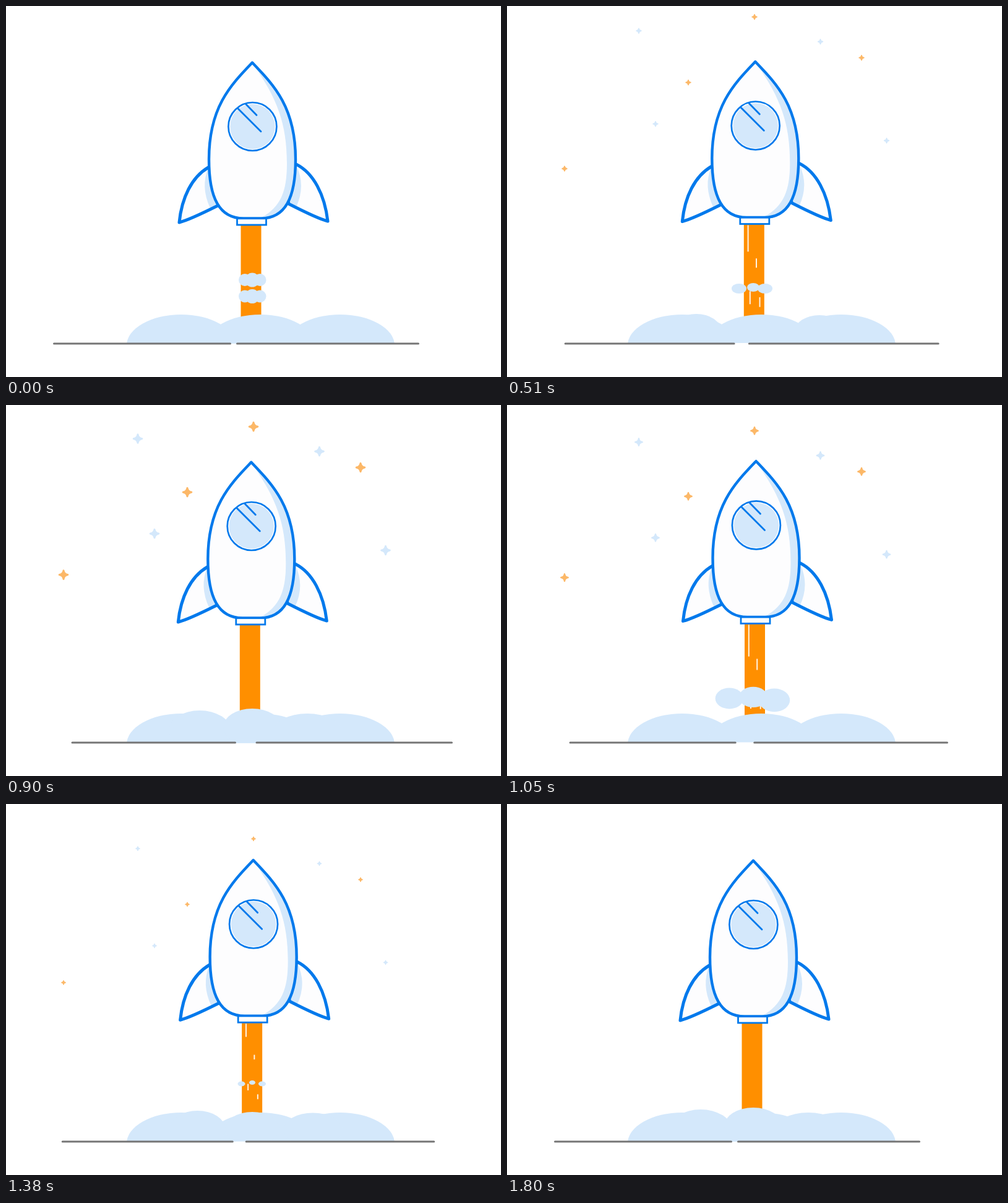
An HTML page with a canvas that plays this animation: 800 by 600 pixels, repeating every 1.83 s.

```html
<!DOCTYPE html>
<html lang="en">
<head>
<meta charset="utf-8">
<title>Rocket launch</title>
<style>
html, body { margin: 0; width: 100%; height: 100%; overflow: hidden; background: #fff; }
canvas { display: block; width: 800px; height: 600px; }
</style>
</head>
<body>
<canvas id="stage" width="800" height="600"></canvas>
<script>
const ctx = document.getElementById('stage').getContext('2d');
const LOOP = 1830, STEP = 30, BEAT = 450, HALF = 900;
const BLUE = '#0079ec', PALE = '#d4e8fb', ORANGE = '#ff8f00', AMBER = '#fcb868';

// Piecewise linear mix of rows [time, ...values].
function mix(rows, t) {
  let i = 1;
  while (i < rows.length - 1 && rows[i][0] < t) i++;
  const a = rows[i - 1], b = rows[i];
  const k = Math.min(1, Math.max(0, (t - a[0]) / (b[0] - a[0])));
  return a.slice(1).map((v, n) => v + (b[n + 1] - v) * k);
}

const SHAKE = [[0, 0, 0], [60, 3.3, -1.5], [210, 5.3, 0], [300, -2.5, -4.2], [450, 0, 0]];
const SPARK = [[0, 0], [60, 0.75], [210, 1], [300, 0.22], [340, 0]];

// Age, centre x, centre y, radius x, radius y.
const PUFFS = [
  [[0, 386, 448, 0, 0], [60, 375, 457, 12, 8], [210, 349, 486, 30, 23],
   [300, 327, 505, 42, 32], [450, 313, 526, 50, 32], [510, 306, 525, 40, 27], [570, 300, 540, 20, 15]],
  [[0, 398, 446, 0, 0], [60, 398, 455, 10, 7], [210, 398, 484, 32, 23],
   [300, 397, 502, 48, 32], [450, 398, 521, 47, 30], [510, 398, 530, 40, 25], [570, 398, 545, 20, 15]],
  [[0, 411, 448, 0, 0], [60, 417, 457, 12, 8], [210, 442, 491, 34, 26],
   [300, 452, 510, 44, 32], [450, 487, 528, 55, 29], [510, 505, 526, 40, 26], [570, 515, 540, 20, 15]]
];

// x, start y, drift over the half loop, colour.
const STARS = [
  [400, -5, 40, AMBER], [293, 101, 40, AMBER], [573, 61, 40, AMBER], [93, 248, 26.6, AMBER],
  [506.5, 35, 40, PALE], [213, 21.5, 33, PALE], [240, 168, 40, PALE], [613.5, 195, 40, PALE]
];

// x, top, top shift, length.
const DASHES = [[6.8, 356, 0, 57], [20.2, 403, 9, 20], [10, 444, 25, 28], [25.7, 468, 6, 21]];

const body = new Path2D('M398 91.5C432 127 468 163 468 248C468 311 451 343.5 412 343.5H384' +
  'C345 343.5 328 311 328 248C328 163 364 127 398 91.5Z');
const shade = new Path2D('M402 98C438 150 454 190 454 255C454 300 444 325 413 342L475 345V90Z');
const finL = new Path2D('M327 261C300 277 284 310 280 350Q296 346 342 323L350 290Z');
const finR = new Path2D('M469 256C497 270 515 305 520 348Q504 344 457 320L450 290Z');
const finShadeL = new Path2D('M327 262Q314 292 330 327L350 320V262Z');
const finShadeR = new Path2D('M469 258Q485 290 469 325L450 320V258Z');

function line(x1, y1, x2, y2, color, width, cap = 'round') {
  ctx.beginPath();
  ctx.moveTo(x1, y1);
  ctx.lineTo(x2, y2);
  ctx.strokeStyle = color;
  ctx.lineWidth = width;
  ctx.lineCap = cap;
  ctx.stroke();
}

function oval(x, y, rx, ry, color = PALE) {
  ctx.beginPath();
  ctx.ellipse(x, y, Math.max(0, rx), Math.max(0, ry), 0, 0, Math.PI * 2);
  ctx.fillStyle = color;
  ctx.fill();
}

function shape(path, shadow, width) {
  ctx.fillStyle = '#fdfdfe';
  ctx.fill(path);
  ctx.save();
  ctx.clip(path);
  ctx.fillStyle = PALE;
  ctx.fill(shadow);
  ctx.restore();
  ctx.strokeStyle = BLUE;
  ctx.lineWidth = width;
  ctx.lineJoin = 'round';
  ctx.stroke(path);
}

function star(x, y, r, color) {
  if (r <= 0) return;
  const tip = r * 0.82, dent = r * 0.16;
  ctx.beginPath();
  ctx.moveTo(x + tip, y);
  for (let i = 1; i <= 4; i++) {
    const a = i * Math.PI / 2, m = a - Math.PI / 4;
    ctx.quadraticCurveTo(x + dent * Math.cos(m), y + dent * Math.sin(m),
      x + tip * Math.cos(a), y + tip * Math.sin(a));
  }
  ctx.closePath();
  ctx.fillStyle = ctx.strokeStyle = color;
  ctx.lineWidth = r * 0.36;
  ctx.lineJoin = 'round';
  ctx.fill();
  ctx.stroke();
}

function flame(t) {
  ctx.fillStyle = ORANGE;
  ctx.fillRect(379.5, 350, 33, 170);
  const [k] = mix(SPARK, t % BEAT);
  if (k <= 0) return;
  DASHES.forEach(([x, top, shift, len], i) => {
    if (i === 0 && t > HALF && k < 0.3) return;
    const y = top + shift * k;
    line(379.5 + x, y, 379.5 + x, y + len * k, 'rgba(255,255,255,.9)', 2, 'butt');
  });
}

function rocket() {
  shape(finL, finShadeL, 5);
  shape(finR, finShadeR, 5);
  shape(body, shade, 4.4);
  ctx.fillStyle = '#fff';
  ctx.fillRect(373.5, 343.7, 47, 10.3);
  ctx.lineJoin = 'miter';
  ctx.lineWidth = 2.8;
  ctx.strokeRect(373.5, 343.7, 47, 10.3);
  oval(398.4, 195, 39, 39, '#fff');
  ctx.lineWidth = 2.7;
  ctx.stroke();
  oval(398.4, 195, 36.4, 36.4);
  line(374.5, 165.5, 412, 203, BLUE, 2.8);
  line(387.5, 158.5, 405, 176.5, BLUE, 2.8);
}

function clouds(t, bottom) {
  ctx.save();
  ctx.beginPath();
  ctx.rect(0, 0, 800, bottom);
  ctx.clip();
  for (const x of [283, 411, 540]) oval(x, 549, 88, 50);
  for (let birth = 0; birth <= t; birth += BEAT) {
    const age = t - birth;
    if (age < 570) for (const rows of PUFFS) oval(...mix(rows, age));
  }
  // Opening bursts that melt into the first puffs.
  const s = 1 - t / 90;
  if (s > 0) for (const y of [443, 469.5]) {
    oval(386, y, 10 * s, 10 * s);
    oval(398, y, 11.5 * s, 11.5 * s);
    oval(410.5, y, 10 * s, 10 * s);
  }
  ctx.restore();
}

function draw(t) {
  const u = 1 - Math.abs(t - HALF) / HALF;
  let [dx, dy] = mix(SHAKE, t % BEAT);
  const kick = Math.max(0, 1 - Math.abs(t - HALF) / 90);
  dx -= 1.7 * kick;
  dy += kick;

  ctx.fillStyle = '#fff';
  ctx.fillRect(0, 0, 800, 600);
  for (const [x, y, drift, color] of STARS) star(x, y + drift * t / HALF, 8.3 * u, color);

  ctx.save();
  ctx.translate(dx, dy);
  flame(t);
  rocket();
  ctx.restore();

  clouds(t, 546 + dy * 0.7);
  line(77.5 + 29.5 * u, 546, 362.5 + 8 * u, 546, '#757575', 3);
  line(373.5 + 31.5 * u, 546, 666.5 + 54 * u, 546, '#757575', 3);
}

const start = performance.now();
function tick() {
  const t = (performance.now() - start) % LOOP;
  draw(Math.floor(t / STEP) * STEP);
  requestAnimationFrame(tick);
}
tick();
</script>
</body>
</html>
```
